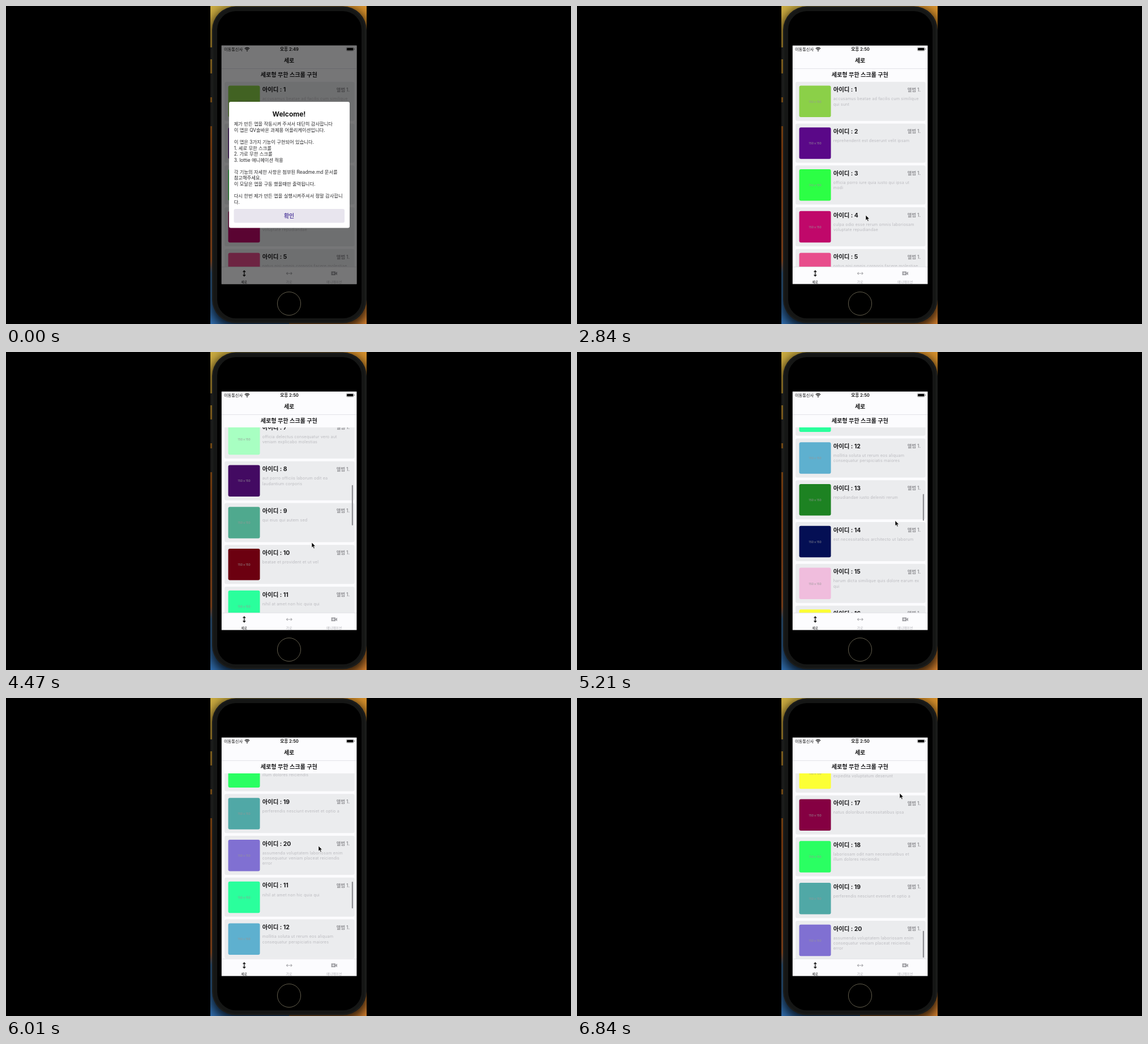
Recreate the animation shown at these times as an HTML page. Size 998 px wide and 561 px high, loop 6.87 s.

```html
<!DOCTYPE html>
<html lang="ko">
<head>
<meta charset="utf-8">
<style>
  html, body { margin: 0; width: 100%; height: 100%; overflow: hidden; background: #000; }
  svg { display: block; width: 998px; height: 561px; }
  text { font-family: Inter, "Noto Sans CJK KR", "Noto Sans CJK", sans-serif; white-space: pre; }
</style>
</head>
<body>
<svg viewBox="0 0 998 561">
  <defs>
    <linearGradient id="leftWall" x2="0" y2="1">
      <stop offset="0" stop-color="#c9ab42"/><stop offset=".12" stop-color="#d8ac3a"/>
      <stop offset=".3" stop-color="#c07c24"/><stop offset=".45" stop-color="#bf5c18"/>
      <stop offset=".8" stop-color="#c4662a"/><stop offset=".84" stop-color="#3a6c9c"/>
      <stop offset="1" stop-color="#2f6cad"/>
    </linearGradient>
    <linearGradient id="rightWall" x2="0" y2="1">
      <stop offset="0" stop-color="#d6902c"/><stop offset=".5" stop-color="#c98224"/>
      <stop offset="1" stop-color="#d8822f"/>
    </linearGradient>
    <filter id="blur" x="-20%" y="-20%" width="140%" height="140%"><feGaussianBlur stdDeviation="9"/></filter>
    <clipPath id="videoClip"><rect x="361" width="276" height="561"/></clipPath>
    <clipPath id="screenClip"><rect x="380.8" y="69.7" width="238.6" height="420.7"/></clipPath>
    <clipPath id="listClip"><rect x="381" y="133" width="238" height="327"/></clipPath>
  </defs>

  <!-- wallpaper and phone -->
  <rect x="361" width="139" height="561" fill="url(#leftWall)"/>
  <rect x="500" width="137" height="561" fill="url(#rightWall)"/>
  <g clip-path="url(#videoClip)">
    <rect x="362" y="4" width="277" height="564" rx="40" opacity=".8" filter="url(#blur)"/>
  </g>
  <path d="M361 73h4v21h-4zM361 119h4v42h-4zM361 170h4v42h-4z" fill="#191a19"/>
  <rect x="364" y=".5" width="273" height="559" rx="42" fill="#1b1c1b"/>
  <rect x="366.5" y="3" width="267" height="554" rx="39" fill="#151615"/>
  <rect x="373" y="9" width="255" height="542" rx="33" fill="#000"/>
  <circle cx="500" cy="525" r="20.6" fill="none" stroke="#625d4c"/>

  <g clip-path="url(#screenClip)">
    <rect x="380" y="69" width="240" height="422" fill="#fcfcfe"/>
    <g clip-path="url(#listClip)">
      <g id="list"></g>
      <rect id="scrollbar" x="610.8" width="2.2" rx="1.1" fill="#8d8d92"/>
    </g>
    <path d="M381 110.5h238M381 460.3h238" stroke="#dcdce2" stroke-width=".8"/>
    <g id="chrome"></g>

    <!-- status icons -->
    <g fill="none" stroke="#111" stroke-width="1.4">
      <path d="M421.8 75.2a5.8 5.8 0 0 1 8.2 0M423.5 77.1a3.4 3.4 0 0 1 4.8 0"/>
    </g>
    <circle cx="425.9" cy="79" r="1" fill="#111"/>
    <rect x="601.2" y="73" width="13" height="6.2" rx="1.8" fill="none" stroke="#777" stroke-width=".6"/>
    <rect x="602.1" y="73.9" width="11.2" height="4.4" rx="1" fill="#000"/>
    <path d="M615.2 75v2" stroke="#777"/>

    <!-- tab icons -->
    <path d="M420.8 468v7.5M418.6 469.2l2.2-2.3 2.2 2.3M418.6 474.2l2.2 2.3 2.2-2.3"
          fill="none" stroke="#151515" stroke-width="1.3"/>
    <path d="M496 471.7h8.5M497.6 469.6l-2.2 2.1 2.2 2.1M502.9 469.6l2.2 2.1-2.2 2.1"
          fill="none" stroke="#a9a9ad" stroke-width="1.1"/>
    <path d="M574.5 468.3h7.5v2.4l2.9-2.2v6.4l-2.9-2.2v2.4h-7.5z" fill="#a4a4a8"/>
    <path d="M578.2 469.8v3.8M576.3 471.7h3.8" stroke="#fcfcfe" stroke-width=".9"/>

    <g id="modal">
      <rect x="380" y="69" width="240" height="422" fill="#000" opacity=".53"/>
      <rect x="394" y="169" width="213" height="222.5" rx="3" fill="#fff"/>
      <rect id="button" x="402.5" y="358" width="195.5" height="24.5" rx="3" fill="#e8e5ee"/>
    </g>
  </g>

  <g clip-path="url(#videoClip)">
    <path id="cursor" d="M0 0v9.2l2.1-1.9 1.5 3.4 1.6-.7-1.5-3.3h2.9z" fill="#000" stroke="#fff" stroke-width=".6"/>
  </g>
</svg>
<script>
const LOOP = 6870, PITCH = 73.75, VIEW_TOP = 133, VIEW_HEIGHT = 327;
const $ = id => document.getElementById(id);

function add(parent, tag, attrs, content) {
  const node = document.createElementNS('http://www.w3.org/2000/svg', tag);
  for (const key in attrs) node.setAttribute(key, attrs[key]);
  if (content) node.textContent = content;
  return parent.appendChild(node);
}

// Text placed by the middle of its capital height.
function label(parent, content, x, middle, size, fill, weight = 400, anchor = 'start', spacing = 0) {
  return add(parent, 'text', {
    x, y: middle + size * 0.36, 'font-size': size, fill,
    'font-weight': weight, 'text-anchor': anchor, 'letter-spacing': spacing
  }, content);
}

const items = [
  ['#8bd048', 'accusamus beatae ad facilis cum similique|qui sunt'],
  ['#5a0888', 'reprehenderit est deserunt velit ipsam'],
  ['#2cff45', 'officia porro iure quia iusto qui ipsa ut|modi'],
  ['#c0086a', 'culpa odio esse rerum omnis laboriosam|voluptate repudiandae'],
  ['#e84d8c', 'natus nisi omnis corporis facere molestiae|rerum in'],
  ['#50a3bb', 'accusamus ea aliquid et amet sequi nemo'],
  ['#a8ffc2', 'officia delectus consequatur vero aut|veniam explicabo molestias'],
  ['#430a62', 'aut porro officiis laborum odit ea|laudantium corporis'],
  ['#4fa98e', 'qui eius qui autem sed'],
  ['#6c0010', 'beatae et provident et ut vel'],
  ['#2aff9c', 'nihil at amet non hic quia qui'],
  ['#5eb0cf', 'mollitia soluta ut rerum eos aliquam|consequatur perspiciatis maiores'],
  ['#1d8222', 'repudiandae iusto deleniti rerum'],
  ['#040f54', 'est necessitatibus architecto ut laborum'],
  ['#f0bddd', 'harum dicta similique quis dolore earum ex|qui'],
  ['#fcff35', 'iusto sunt nobis quasi veritatis quas|expedita voluptatum deserunt'],
  ['#850042', 'natus doloribus necessitatibus ipsa'],
  ['#2aff62', 'laboriosam odit nam necessitatibus et|illum dolores reiciendis'],
  ['#50a8a6', 'perferendis nesciunt eveniet et optio a'],
  ['#8070d2', 'assumenda voluptatem laboriosam enim|consequatur veniam placeat reiciendis|error']
];

// The last page of ten is delivered twice.
for (let row = 0; row < 30; row++) {
  const index = row < 20 ? row : row - 10;
  const [color, description] = items[index];
  const card = add($('list'), 'g', { transform: `translate(0 ${133.7 + row * PITCH})` });
  add(card, 'rect', { x: 386, width: 229.5, height: 69, rx: 3, fill: '#ebecee' });
  add(card, 'rect', { x: 392.5, y: 6.8, width: 56, height: 55.5, rx: 3, fill: color });
  label(card, '150 x 150', 420.7, 35, 5.1, '#969696', 400, 'middle');
  label(card, `아이디 : ${index + 1}`, 452.7, 13.9, 10.4, '#18181a', 700);
  label(card, '앨범 1.', 607.3, 14, 8.4, '#949498', 600, 'end');
  description.split('|').forEach((line, i) =>
    label(card, line, 452.7, 30.2 + i * 9.2, 7.2, '#bcbcc0', 400, 'start', 0.15));
}

const chrome = $('chrome');
label(chrome, '이동통신사', 385, 76.2, 7.2, '#151515');
const clock = label(chrome, '', 500.5, 76.2, 7.6, '#111', 600, 'middle');
label(chrome, '세로', 500, 96.5, 9.9, '#181818', 600, 'middle');
label(chrome, '세로형 무한 스크롤 구현', 499.7, 121.2, 10.1, '#18181a', 700, 'middle');
label(chrome, '세로', 420.6, 487.3, 5.9, '#151515', 500, 'middle');
label(chrome, '가로', 500, 487.3, 5.9, '#b4b4b8', 400, 'middle');
label(chrome, '애니메이션', 579.6, 487.3, 5.9, '#b4b4b8', 400, 'middle');

const modal = $('modal');
label(modal, 'Welcome!', 500, 191, 12, '#151515', 700, 'middle');
[
  '제가 만든 앱을 작동시켜 주셔서 대단히 감사합니다',
  '이 앱은 QV솔바온 과제용 어플리케이션입니다.', '',
  '이 앱은 3가지 기능이 구현되어 있습니다.',
  '1. 세로 무한 스크롤', '2. 가로 무한 스크롤', '3. lottie 애니메이션 적용', '',
  '각 기능의 자세한 사항은 첨부된 Readme.md 문서를', '참고해주세요.',
  '이 모달은 앱을 구동 했을때만 출력됩니다.', '',
  '다시 한번 제가 만든 앱을 실행시켜주셔서 정말 감사합니', '다.'
].forEach((line, i) => label(modal, line, 402.7, 208.5 + i * 10.54, 8.3, '#2a2a2c'));
label(modal, '확인', 500, 370.3, 9.9, '#5b48a2', 700, 'middle');

// Monotone cubic through [time, value] points.
function track(points) {
  const slope = i => (points[i + 1][1] - points[i][1]) / (points[i + 1][0] - points[i][0]);
  const tangents = points.map((_, i) => {
    if (i === 0 || i === points.length - 1) return 0;
    const a = slope(i - 1), b = slope(i);
    return a * b > 0 ? 2 * a * b / (a + b) : 0;
  });
  return t => {
    if (t <= points[0][0]) return points[0][1];
    const i = points.findIndex(p => p[0] >= t) - 1;
    if (i < 0) return points[points.length - 1][1];
    const [t0, v0] = points[i], [t1, v1] = points[i + 1];
    const h = t1 - t0, u = (t - t0) / h, w = 1 - u;
    return v0 * (1 + 2 * u) * w * w + v1 * u * u * (3 - 2 * u)
      + h * u * w * (tangents[i] * w - tangents[i + 1] * u);
  };
}

const scrollAt = track([[3000, 0], [3640, 285.6], [4470, 457], [5210, 792], [6010, 1291.2], [6840, 1879.5]]);
const cursorX = track([[300, 642], [1370, 511], [1470, 510], [3000, 510], [3640, 534],
  [4470, 540], [5210, 562], [6010, 552], [6840, 570]]);
const cursorY = track([[300, 440], [1370, 370], [1470, 369], [3000, 369], [3640, 370],
  [4470, 336], [5210, 297.5], [6010, 261], [6840, 168]]);
const clamp = value => Math.max(0, Math.min(1, value));

function render(t) {
  const scroll = scrollAt(t);
  const loaded = t < 3750 ? 10 : t < 5000 ? 20 : 30;
  const ratio = VIEW_HEIGHT / (loaded * PITCH + 5);
  $('list').setAttribute('transform', `translate(0 ${-scroll})`);
  $('scrollbar').setAttribute('y', VIEW_TOP + 0.6 + scroll * ratio);
  $('scrollbar').setAttribute('height', VIEW_HEIGHT * ratio - 1);
  $('scrollbar').setAttribute('opacity', clamp((t - 3000) / 100));

  clock.textContent = t < 2000 ? '오후 2:49' : '오후 2:50';
  modal.setAttribute('opacity', 1 - clamp((t - 2000) / 220));
  $('button').setAttribute('fill', t < 1670 ? '#e8e5ee' : '#dfdaea');
  $('cursor').setAttribute('transform', `translate(${cursorX(t)} ${cursorY(t)})`);
}

const start = performance.now();
function tick() {
  render((performance.now() - start) % LOOP);
  requestAnimationFrame(tick);
}
tick();
</script>
</body>
</html>
```
